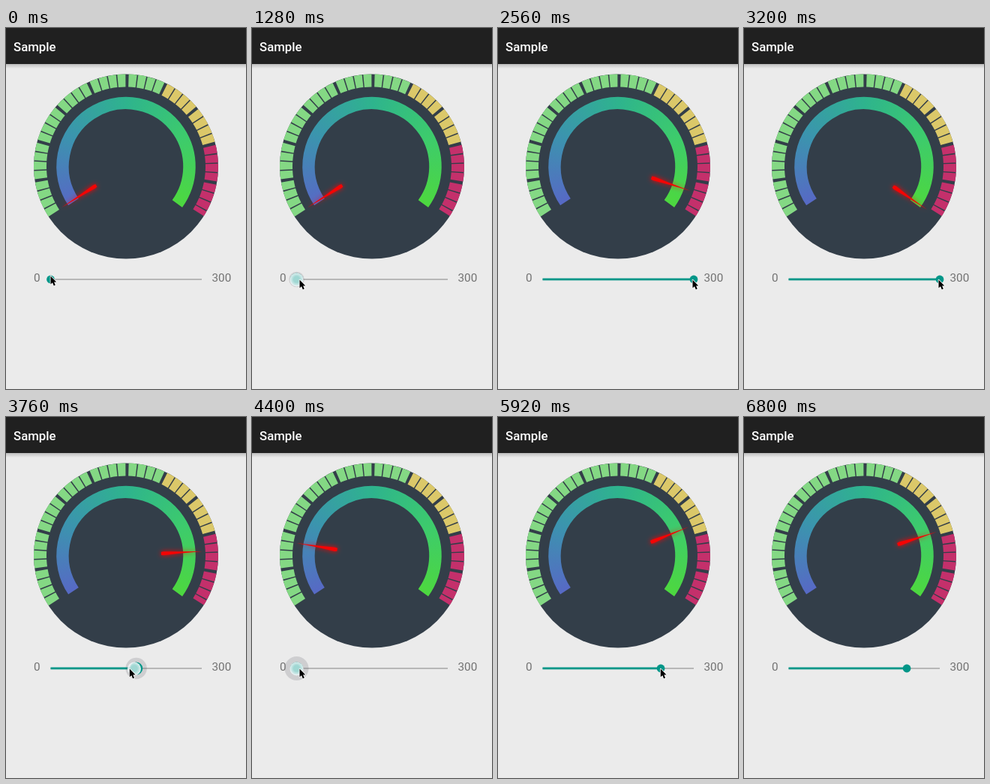
An HTML page with a canvas that plays this animation: 320x481 px, repeating every 6.88 s.

```html
<!DOCTYPE html>
<html lang="en">
<head>
<meta charset="utf-8">
<title>Gauge sample</title>
<style>
  html, body { margin: 0; width: 100%; height: 100%; overflow: hidden; background: #ebebeb; }
  canvas { display: block; width: 320px; height: 481px; }
</style>
</head>
<body>
<canvas id="stage"></canvas>
<script>
const LOOP = 6880, STEP = 80;
const CX = 160, CY = 184.5, START = 146, SWEEP = 250;
const TRACK_X = 59.5, TRACK_W = 201.5, TRACK_Y = 335;
const TEAL = '#009688', DARK = '#333e49';
const LAG = 300, CURSOR_END = 6400;

const canvas = document.getElementById('stage');
const ctx = canvas.getContext('2d');
const dpr = window.devicePixelRatio || 1;
canvas.width = 320 * dpr;
canvas.height = 481 * dpr;
ctx.scale(dpr, dpr);

const rad = deg => deg * Math.PI / 180;
const ramp = (t, from, to) => Math.min(1, Math.max(0, (t - from) / (to - from)));
const ease = (t, from, to) => {
  const u = ramp(t, from, to);
  return u * u * (3 - 2 * u);
};

// Three drags: up to 300, back to 0, then up to 235
const sliderAt = t => ease(t, 1380, 2080) - ease(t, 3350, 4250) + .782 * ease(t, 4640, 4920);

// The needle chases the slider with an exponential lag
function needleAt(t) {
  const dt = 10;
  let value = 0;
  for (let s = 0; s < t; s += dt) value += (sliderAt(s + dt / 2) - value) * (1 - Math.exp(-dt / LAG));
  return value;
}

// Thumb held down: swells over `grow` ms, fades after release
const held = (t, grow) => [[1200, 2280], [3260, 5100]].reduce((sum, [down, up]) =>
  sum + ramp(t, down, down + grow) * (1 - ramp(t, up, up + 200)), 0);

function disc(x, y, r, fill) {
  ctx.fillStyle = fill;
  ctx.beginPath();
  ctx.arc(x, y, r, 0, 2 * Math.PI);
  ctx.fill();
}

function arc(r, width, from, to, stroke) {
  ctx.strokeStyle = stroke;
  ctx.lineWidth = width;
  ctx.beginPath();
  ctx.arc(0, 0, r, rad(from), rad(to));
  ctx.stroke();
}

function polygon(points, fill) {
  ctx.fillStyle = fill;
  ctx.beginPath();
  points.forEach(p => ctx.lineTo(...p));
  ctx.closePath();
  ctx.fill();
}

function text(str, x, y, font, fill) {
  ctx.font = font + ' Roboto, sans-serif';
  ctx.fillStyle = fill;
  ctx.fillText(str, x, y);
}

function drawHeader() {
  const shade = ctx.createLinearGradient(0, 48, 0, 54);
  shade.addColorStop(0, '#bdbdbd');
  shade.addColorStop(1, '#ebebeb');
  ctx.fillStyle = shade;
  ctx.fillRect(0, 48, 320, 6);
  ctx.fillStyle = '#202020';
  ctx.fillRect(0, 0, 320, 48);
  text('Sample', 10, 30.5, '500 16.8px', '#fff');
}

function drawDial() {
  disc(0, 0, 123, DARK);
  // Ten groups of four equal blocks
  const group = 24.92, pitch = 5.92, block = 5.17;
  for (let i = 0; i < 40; i++) {
    const g = Math.floor(i / 4);
    const from = START + 1.1 + g * group + i % 4 * pitch;
    const color = g < 6 ? '#84d884' : g < 8 ? '#dbc869' : '#c4306b';
    arc(114.5, 17, from, Math.min(from + block, 392.5), color);
  }

  const blend = ctx.createConicGradient(rad(START - 10), 0, 0);
  ['#5769c5', '#3b94ae', '#2eb48d', '#3dcb6c', '#4dd83f'].forEach((color, i) =>
    blend.addColorStop((10 + i / 4 * SWEEP) / 360, color));
  arc(84.5, 16.5, START, START + SWEEP, blend);
}

function drawNeedle(value) {
  ctx.save();
  ctx.rotate(rad(147.5 + 249 * value));
  ctx.shadowColor = '#f00';
  ctx.shadowBlur = 6 * dpr;
  polygon([[47, -2], [50, -2.6], [74, -1.1], [102, 0], [74, 1.1], [50, 2.6], [47, 2]], '#f40404');
  ctx.restore();
}

function drawSlider(t) {
  const xAt = time => TRACK_X + TRACK_W * sliderAt(time);
  const x = xAt(t), grip = held(t, 80), halo = held(t, 700);
  ctx.fillStyle = '#8e8e8e';
  ctx.fillRect(TRACK_X, 334.4, TRACK_W, 1.1);
  ctx.fillStyle = TEAL;
  ctx.fillRect(TRACK_X, 333.5, x - TRACK_X, 2.8);
  if (grip) disc(x, TRACK_Y, 9.5 + 6.5 * halo, `rgba(90,90,100,${.2 * grip})`);
  disc(x, TRACK_Y, 5.4 + 3.2 * grip, TEAL);
  if (grip) {
    // Pale highlight runs slightly ahead of the thumb
    const ahead = xAt(t + 8);
    const glow = ctx.createRadialGradient(ahead, TRACK_Y, 4, ahead, TRACK_Y, 9);
    glow.addColorStop(0, `rgba(236,246,246,${.68 * grip})`);
    glow.addColorStop(1, `rgba(240,246,248,${.95 * grip})`);
    disc(ahead, TRACK_Y + .5, 9, glow);
  }
  text('0', 37, 338, '15.3px', '#737373');
  text('300', 274.5, 338, '15.3px', '#737373');
}

function drawCursor(t) {
  const near = ease(t, 640, 1040);
  ctx.save();
  ctx.translate(59 + 4 * near + 196 * sliderAt(t + 30), 330.5 + 5 * near);
  ctx.lineJoin = 'round';
  ctx.lineWidth = 1.6;
  ctx.strokeStyle = '#fff';
  polygon([[.5, 0], [.5, 11], [3, 8.8], [4.8, 13], [6.8, 12.1], [5.1, 8], [8.3, 8]], '#000');
  ctx.stroke();
  ctx.fill();
  ctx.restore();
}

function draw(t) {
  ctx.fillStyle = '#ebebeb';
  ctx.fillRect(0, 0, 320, 481);
  drawHeader();
  ctx.save();
  ctx.translate(CX, CY);
  drawDial();
  drawNeedle(needleAt(t));
  ctx.restore();
  drawSlider(t);
  if (t < CURSOR_END) drawCursor(t);
}

const begin = performance.now();
function tick() {
  const t = (performance.now() - begin) % LOOP;
  draw(Math.floor(t / STEP) * STEP);
  requestAnimationFrame(tick);
}
tick();
</script>
</body>
</html>
```
